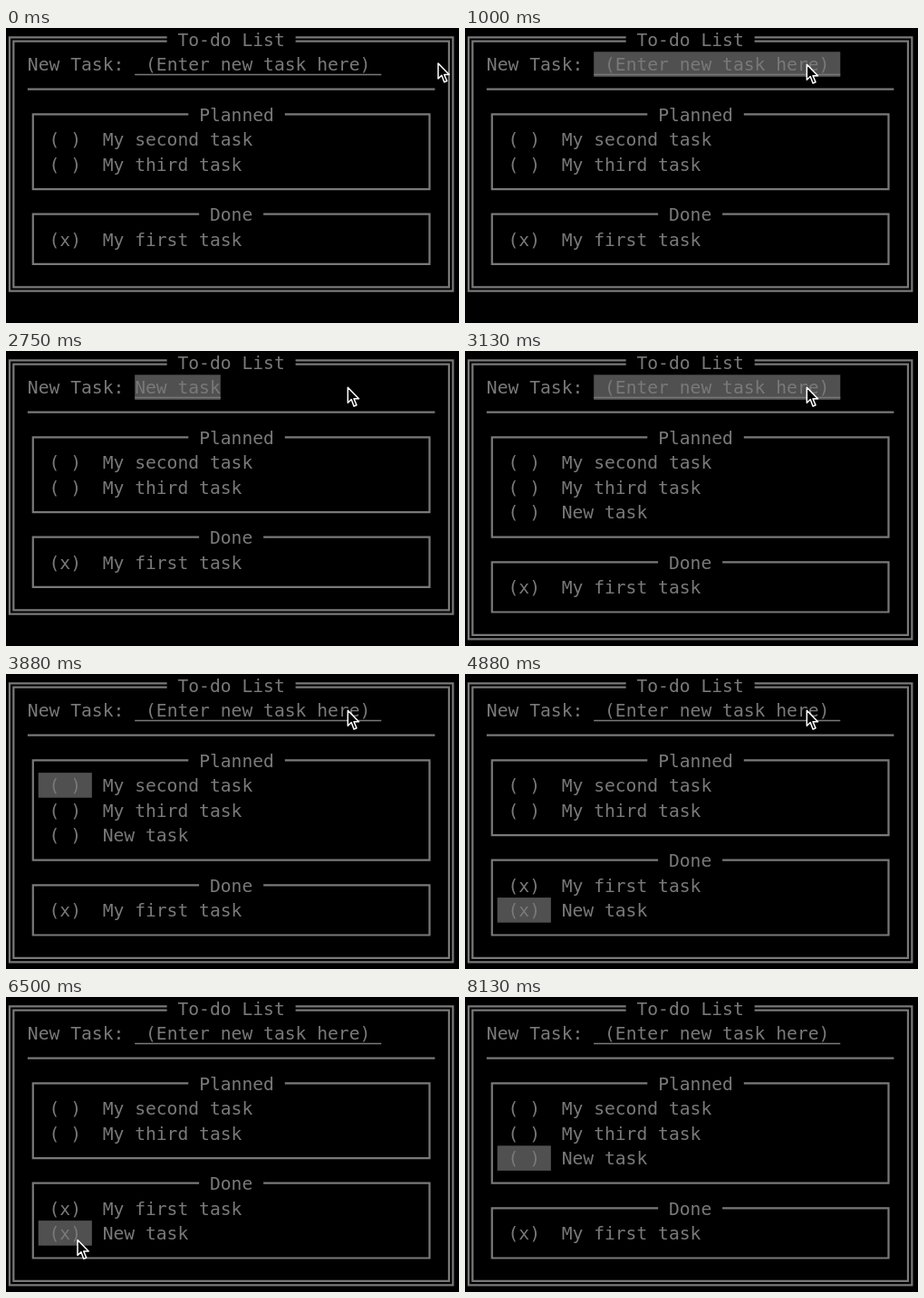
An HTML page that plays this animation: 500 px wide and 326 px high, repeating every 8260 ms.

```html
<!DOCTYPE html>
<html lang="en">
<head>
<meta charset="utf-8">
<title>To-do List</title>
<style>
  html, body { margin: 0; width: 100%; height: 100%; overflow: hidden; background: #000; }
  svg { display: block; width: 500px; height: 326px; }
  text { font: 19.65px "DejaVu Sans Mono", "Noto Sans Mono", monospace; fill: #797979; white-space: pre; }
  .line { fill: none; stroke: #797979; stroke-width: 2.2; }
  .rule { stroke-width: 1.5; }
  .focus { fill: #505050; }
  #pointer { fill: #000; stroke: #fff; stroke-width: 1.5; stroke-linejoin: round; }
</style>
</head>
<body>
<svg viewBox="0 0 500 326">
  <g id="screen"></g>
  <path id="pointer" d="M1.5 1.5V18.5L5.4 14.8L8.2 22.3L11.2 21L8.2 14H13.7Z"/>
</svg>
<script>
const LOOP = 8260, CELL = 11.83, ROW = 27.6;
const FIELD = 12;
const PLACEHOLDER = ' (Enter new task here) ';
const screen = document.getElementById('screen');
const pointer = document.getElementById('pointer');

const colX = c => .2 + c * CELL;
const midX = c => colX(c + .5);
const midY = r => 12.5 + r * ROW;

const text = (col, row, s) =>
  `<text x="${colX(col)}" y="${midY(row) + 7.2}">${s}</text>`;
const line = (d, extra = '') => `<path class="line ${extra}" d="${d}"/>`;
const focus = (col, row, n) =>
  `<rect class="focus" x="${colX(col)}" y="${midY(row) - ROW / 2}" width="${n * CELL}" height="${ROW}"/>`;

// A frame whose top edge is broken by a title; d widens it from the cell centres.
function frame(c0, c1, r0, r1, col, title, d = 0) {
  const l = midX(c0) - d, r = midX(c1) + d, t = midY(r0) - d, b = midY(r1) + d;
  const gap0 = colX(col - 1), gap1 = colX(col + title.length + 1);
  return line(`M${gap0} ${t}H${l}V${b}H${r}V${t}H${gap1}`);
}

function typed(t) {
  if (t < 1880 || t >= 3130) return '';
  const n = t < 2130 ? 1 : t < 2380 ? 3 : Math.min(8, 5 + Math.floor((t - 2375) / 125));
  return 'New task'.slice(0, n);
}

function focusRow(t) {
  const moves = [[7500, 6], [4880, 9], [4380, 6], [4130, 5], [3880, 4], [1000, 1]];
  const hit = moves.find(([at]) => t >= at);
  return hit ? hit[1] : -1;
}

function list(title, col, top, tasks, mark, active) {
  let out = frame(2, 39, top, top + tasks.length + 1, col, title) + text(col, top, title);
  tasks.forEach((task, i) => {
    const row = top + 1 + i;
    if (row === active) out += focus(3, row, 5);
    out += text(4, row, `(${mark})`) + text(9, row, task);
  });
  return out;
}

function draw(t) {
  const active = focusRow(t);
  const planned = ['My second task', 'My third task'];
  const done = ['My first task'];
  if (t >= 3130) (t >= 4880 && t < 7500 ? done : planned).push('New task');

  const doneTop = planned.length + 5;
  const bottom = doneTop + done.length + 2;
  const entry = typed(t) || PLACEHOLDER;
  const title = 'To-do List';

  return frame(0, 41, 0, bottom, 16, title, 2.2) +
    frame(0, 41, 0, bottom, 16, title, -2.2) +
    text(16, 0, title) +
    text(2, 1, 'New Task:') +
    (active === 1 ? focus(FIELD, 1, entry.length) : '') +
    text(FIELD, 1, entry) +
    line(`M${colX(FIELD)} 51.5H${colX(FIELD + entry.length)}`, 'rule') +
    line(`M${colX(2)} ${midY(2)}H${colX(40)}`) +
    list('Planned', 18, 3, planned, ' ', active) +
    list('Done', 19, doneTop, done, 'x', active);
}

function glide(a, b, p, bow = 0) {
  p = Math.max(0, Math.min(1, p));
  const e = p * p * (3 - 2 * p);
  return [a[0] + (b[0] - a[0]) * e, a[1] + (b[1] - a[1]) * e + bow * Math.sin(Math.PI * e)];
}

// Pointer place on an eighth-of-a-second tick; null when it has left.
function pointerAt(tick) {
  const start = [475.5, 37.5], field = [375.8, 38.7], near = [88, 257];
  if (tick < 43) return glide(start, field, tick / 4, 4);
  if (tick <= 50) return glide(field, near, (tick - 43) / 7);
  if (tick === 51) return [76.5, 265];
  if (tick < 64) return [77.5, 267];
  return tick === 64 ? [78, 277] : null;
}

let shown = '';
function render(now) {
  const t = now % LOOP;
  const html = draw(t);
  if (html !== shown) screen.innerHTML = shown = html;

  const at = pointerAt(Math.floor(Math.floor(t / 10) * 10 / 125));
  pointer.style.display = at ? '' : 'none';
  if (at) pointer.setAttribute('transform', `translate(${at})`);
}

const begin = performance.now();
function loop() {
  render(performance.now() - begin);
  requestAnimationFrame(loop);
}
loop();
</script>
</body>
</html>
```
